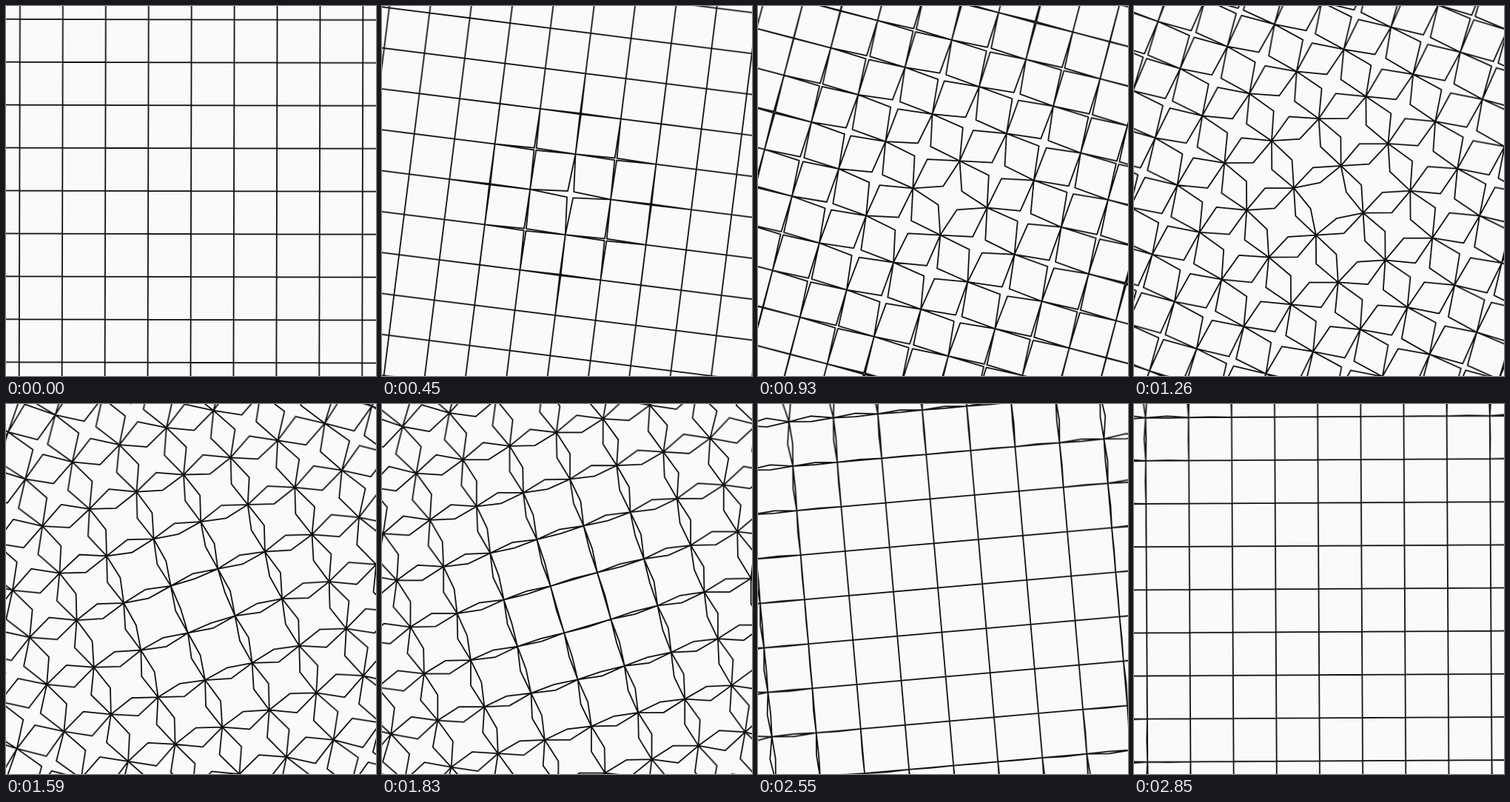
Write an HTML page with a canvas that moves like this. It is 500 by 500 pixels and loops after 2880 ms.

```html
<!DOCTYPE html>
<html lang="en">
<head>
<meta charset="utf-8">
<title>Unfolding grid</title>
<style>
  html, body { margin: 0; width: 100%; height: 100%; overflow: hidden; background: #fafafa; }
  canvas { display: block; }
</style>
</head>
<body>
<canvas id="stage" width="500" height="500"></canvas>
<script>
const SIZE = 500, STEP = 30, STEPS = 96;
const CELL = 58, REACH = 8;
const SPREAD = 0.65, DELAY = 0.07;
const SAMPLES = 4, SHUTTER = 0.6;

const view = document.getElementById('stage').getContext('2d');
const layer = document.createElement('canvas');
layer.width = layer.height = SIZE;
const ctx = layer.getContext('2d');

const smooth = x => {
  x = Math.min(1, Math.max(0, x));
  return x * x * (3 - 2 * x);
};

// Four corners stay on the lattice; the points between move out to the sides.
function addStar(x, y, half, open) {
  const r = half * open;
  ctx.moveTo(x + r, y);
  ctx.lineTo(x + half, y + half);
  ctx.lineTo(x, y + r);
  ctx.lineTo(x - half, y + half);
  ctx.lineTo(x - r, y);
  ctx.lineTo(x - half, y - half);
  ctx.lineTo(x, y - r);
  ctx.lineTo(x + half, y - half);
  ctx.closePath();
}

function drawScene(p) {
  const pitch = CELL * Math.SQRT2 * Math.pow(2, -p / 2);
  const center = SIZE / 2 + CELL / 2 * p;

  ctx.setTransform(1, 0, 0, 1, 0, 0);
  ctx.fillStyle = '#fafafa';
  ctx.fillRect(0, 0, SIZE, SIZE);
  ctx.translate(center, center);
  ctx.rotate((p - 1) * Math.PI / 4);

  ctx.beginPath();
  for (let i = -REACH; i <= REACH; i++) {
    for (let j = -REACH; j <= REACH; j++) {
      const open = smooth((p - DELAY * Math.hypot(i, j)) / SPREAD);
      addStar(i * pitch, j * pitch, pitch / 2, open);
    }
  }
  ctx.strokeStyle = '#111';
  ctx.lineWidth = 1.8;
  ctx.lineJoin = 'round';
  ctx.stroke();
}

function frame() {
  const step = Math.floor((performance.now() + 1) / STEP) % STEPS;
  // Average a few moments within the step for a soft motion blur.
  for (let s = 0; s < SAMPLES; s++) {
    drawScene((step + SHUTTER * (s + 0.5) / SAMPLES) / STEPS);
    view.globalAlpha = 1 / (s + 1);
    view.drawImage(layer, 0, 0);
  }
  requestAnimationFrame(frame);
}
frame();
</script>
</body>
</html>
```
